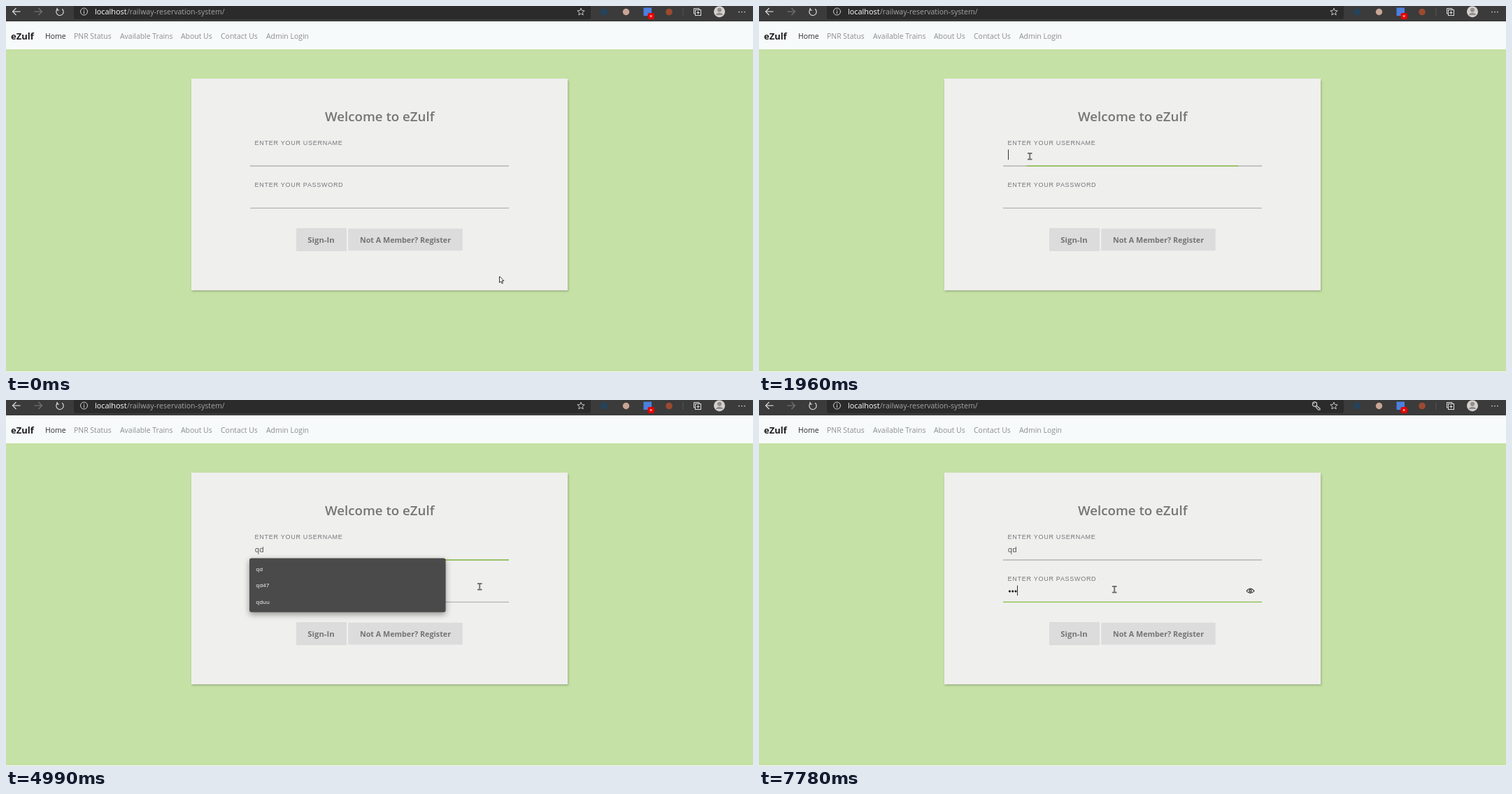
An HTML page with a canvas that plays this animation: 1068x524 px, repeating every 8000 ms.

```html
<!DOCTYPE html>
<html lang="en">
<head>
<meta charset="utf-8">
<title>Sign-in form</title>
<style>
  html, body { margin: 0; width: 100%; height: 100%; overflow: hidden; background: #c5e1a5; }
  canvas { display: block; width: 1068px; height: 524px; }
</style>
</head>
<body>
<canvas id="stage" width="1068" height="524"></canvas>
<script>
const ctx = document.getElementById('stage').getContext('2d');
const LOOP = 8000;
const UI = '"Open Sans", "Noto Sans", sans-serif';
const LABEL = '"Liberation Sans", Arial, sans-serif';
const GREEN = '#8bc34a';
const BRAND = 'eZulf';

const FOCUS_USER = 1560, OPEN_LIST = 2180, TYPE_USER = 3360, BLUR_USER = 4990, FOCUS_PASS = 5050;
const KEYS = [7540, 7630, 7780];
const ALL_NAMES = ['qd', 'staff7', '2031kzt5086', 'melidora_tuvash', 'tuvi', 'melidoratuvash'];
const MATCHES = ['qd', 'qd47', 'qduu'];

// time, x, y of the pointer, held until the next entry
const ARROW_PATH = [[0, 705.5, 387], [70, 680.5, 376.5], [570, 640, 352], [650, 535, 298]];
const BEAM_PATH = [
  [730, 439, 249], [960, 430, 243], [1034, 417, 234], [1108, 405, 226],
  [1182, 396, 220], [1256, 390, 217], [1330, 387, 215],
  [4050, 402, 209], [4127, 470, 205], [4203, 560, 206], [4280, 640, 213], [4357, 690, 225],
  [4433, 714, 239], [4510, 711, 251], [4587, 698, 260], [4663, 685, 265], [4740, 677, 267],
  [5520, 671, 267], [5595, 656, 268], [5670, 570, 270], [5740, 508, 271]
];
const USER_CARET = [[FOCUS_USER, 2200], [2720, 3900], [4430, BLUR_USER]];
const PASS_CARET = [[FOCUS_PASS, 5510], [6060, 6610], [7160, LOOP]];

const latest = (path, t) => path.filter(p => p[0] <= t).pop();
const within = (spans, t) => spans.some(([a, b]) => t >= a && t < b);

// Time of the latest of n evenly spaced updates between a and b
function held(t, a, b, n) {
  const gap = (b - a) / (n - 1);
  return a + Math.floor((Math.min(Math.max(t, a), b) - a) / gap + 1e-6) * gap;
}

// CSS "ease" curve
function ease(x) {
  if (x <= 0) return 0;
  if (x >= 1) return 1;
  const bez = (p, q, s) => 3 * p * s * (1 - s) ** 2 + 3 * q * s * s * (1 - s) + s ** 3;
  let lo = 0, hi = 1;
  for (let i = 0; i < 20; i++) {
    const mid = (lo + hi) / 2;
    if (bez(.25, .25, mid) < x) lo = mid; else hi = mid;
  }
  return bez(.1, 1, lo);
}

function rect(x, y, w, h, color, r = 0) {
  ctx.fillStyle = color;
  ctx.beginPath();
  ctx.roundRect(x, y, w, h, r);
  ctx.fill();
}

function shadowRect(x, y, w, h, color, r, alpha, blur, dx, dy) {
  ctx.save();
  ctx.shadowColor = `rgba(0,0,0,${alpha})`;
  ctx.shadowBlur = blur;
  ctx.shadowOffsetX = dx;
  ctx.shadowOffsetY = dy;
  rect(x, y, w, h, color, r);
  ctx.restore();
}

function disc(x, y, r, color) {
  ctx.fillStyle = color;
  ctx.beginPath();
  ctx.arc(x, y, r, 0, 7);
  ctx.fill();
}

function ring(x, y, r, color, from = 0, to = 2 * Math.PI, width = 1.1) {
  ctx.strokeStyle = color;
  ctx.lineWidth = width;
  ctx.beginPath();
  ctx.arc(x, y, r, from, to);
  ctx.stroke();
}

function line(points, color, width = 1.1) {
  ctx.strokeStyle = color;
  ctx.lineWidth = width;
  ctx.beginPath();
  points.forEach(([x, y]) => ctx.lineTo(x, y));
  ctx.stroke();
}

function text(str, x, y, size, color, weight = 400, family = UI, spacing = 0, align = 'left') {
  ctx.font = `${weight} ${size}px ${family}`;
  ctx.letterSpacing = spacing + 'px';
  ctx.textAlign = align;
  ctx.fillStyle = color;
  ctx.fillText(str, x, y);
}

function navArrow(x, dir, color) {
  line([[x - 5.5, 8], [x + 5.5, 8]], color);
  const tip = x + 5.5 * dir;
  line([[tip - 5 * dir, 3], [tip, 8], [tip - 5 * dir, 13]], color);
}

function star(x, y) {
  const points = [];
  for (let i = 0; i <= 10; i++) {
    const a = i * Math.PI / 5 - Math.PI / 2, r = i % 2 ? 2.4 : 5.4;
    points.push([x + r * Math.cos(a), y + r * Math.sin(a)]);
  }
  line(points, '#c4c4c4', 1);
}

function keyIcon() {
  ring(794.5, 6, 3.1, '#d8d8d8');
  disc(793.6, 5.2, .8, '#d8d8d8');
  line([[797, 8], [802, 12.3], [802, 14], [799.6, 14], [795.5, 9.4]], '#d8d8d8');
}

function toolbar(t) {
  rect(0, 0, 1068, 22, '#3b3b3b');
  rect(97, -8, 739, 27, '#2b2b2b', 3);
  navArrow(15, -1, '#e2e2e2');
  navArrow(46, 1, '#777');
  ring(77, 8.3, 5.2, '#e2e2e2', -.9, 4.1);
  line([[73, 2.8], [73, 6], [76, 6]], '#e2e2e2', 1);
  ring(111.5, 8, 5, '#d0d0d0', 0, 7, 1);
  rect(111, 7.2, 1, 3.8, '#d0d0d0');
  rect(111, 5, 1, 1.2, '#d0d0d0');
  text('localhost', 127, 12.3, 10.9, '#fff');
  text('/railway-reservation-system/', 173, 12.3, 10.55, '#a5a5a5');
  if (t >= KEYS[0]) keyIcon();
  star(822, 8.5);

  disc(855, 8.5, 5, '#24435c');
  disc(886.5, 8.5, 4.7, '#c9a595');
  rect(911.5, 2.5, 11.5, 11.5, '#4c80e0');
  rect(917.5, 10, 9.5, 9, '#e60000', 2);
  line([[920.8, 13.2], [923.4, 15.8]], '#fff', 1);
  line([[923.4, 13.2], [920.8, 15.8]], '#fff', 1);
  disc(948, 8.5, 4.8, '#9c4a30');
  rect(967.5, 3, 1, 11, '#555');

  line([[985, 11], [983.5, 11], [983.5, 3.5], [991, 3.5], [991, 5]], '#dcdcdc', 1);
  ctx.strokeRect(985.5, 5.5, 8, 8);
  line([[989.5, 7.3], [989.5, 11.7]], '#dcdcdc', 1);
  line([[987.3, 9.5], [991.7, 9.5]], '#dcdcdc', 1);

  disc(1020, 8.2, 8, '#d4d0cd');
  disc(1020, 5.8, 3, '#918d8a');
  ctx.beginPath();
  ctx.ellipse(1020, 13, 5, 3.2, 0, Math.PI, 0);
  ctx.fill();
  for (let i = 0; i < 3; i++) disc(1048 + i * 4, 8.5, .85, '#e2e2e2');
}

function navbar() {
  rect(0, 22, 1068, 40, '#f7fafa');
  text(BRAND, 7, 48, 13, '#1c1e1f', 700);
  text('Home', 56, 46.6, 10.45, '#2b2d2e');
  const links = [['PNR Status', 97], ['Available Trains', 163], ['About Us', 250],
    ['Contact Us', 307], ['Admin Login', 372]];
  links.forEach(([label, x]) => text(label, x, 46.6, 10.45, '#8b8e8f'));
}

function underline(y, h, grown) {
  rect(349, y, 370, h, '#b4b6b2');
  if (grown > 0) rect(534 - 185 * grown, y, 370 * grown, h, GREEN);
}

function form(t) {
  shadowRect(265, 104, 538, 303, '#efefee', 0, .24, 3, 1, 1.5);
  text('Welcome to ' + BRAND, 456, 165, 18.7, '#757575', 600);
  text('ENTER YOUR USERNAME', 355.6, 199.4, 9.02, '#757779', 400, LABEL, .694);
  text('ENTER YOUR PASSWORD', 355.6, 259.4, 9.02, '#757779', 400, LABEL, .694);

  const grow = ease((held(t, 1560, 2260, 10) - 1640) / 600);
  const swap = ease((held(t, 4990, 5740, 11) - FOCUS_PASS) / 600);
  underline(228.2, 1.6, grow - swap);
  underline(288.8, 1.2, swap);

  rect(415, 318, 72, 33, '#dcdcdc', 1);
  rect(489.3, 318.7, 163.5, 31.6, '#dcdcdc', 1);
  text('Sign-In', 450.5, 339, 11.3, '#747474', 700, UI, 0, 'center');
  text('Not A Member? Register', 571, 339, 10.75, '#747474', 700, UI, 0, 'center');
}

function eyeIcon() {
  ctx.strokeStyle = '#222';
  ctx.lineWidth = 1.1;
  ctx.beginPath();
  ctx.moveTo(697, 273.5);
  ctx.quadraticCurveTo(702.5, 266.5, 708, 273.5);
  ctx.quadraticCurveTo(702.5, 279.5, 697, 273.5);
  ctx.stroke();
  ring(702.5, 273.2, 1.6, '#222', 0, 7, 1.2);
}

function inputs(t) {
  const typed = t >= TYPE_USER;
  if (typed) text('qd', 355.8, 217.5, 10.45, '#434648');
  if (within(USER_CARET, t)) rect(typed ? 369 : 356, 205.5, 1, 14.5, '#333');

  const dots = KEYS.filter(k => t >= k).length;
  for (let i = 0; i < dots; i++) disc(358.4 + i * 4.3, 273.8, 1.6, '#222');
  if (within(PASS_CARET, t)) rect(356 + Math.round(dots * 4.4), 265.5, 1, 14.5, '#333');
  if (dots) eyeIcon();
}

function suggestions(t) {
  if (t < OPEN_LIST || t >= FOCUS_PASS) return;
  const names = t < TYPE_USER ? ALL_NAMES : MATCHES;
  shadowRect(348, 226.4, 280.6, names.length * 23.8 + 6, '#4a4a4a', 3, .4, 9, 0, 3);
  names.forEach((name, i) => text(name, 357.3, 244.6 + i * 23.8, 8, '#fff'));
}

function arrow(x, y) {
  ctx.beginPath();
  [[0, 0], [0, 9], [2.1, 7.2], [3.6, 10.4], [5, 9.7], [3.6, 6.6], [6.3, 6.4]]
    .forEach(([dx, dy]) => ctx.lineTo(x + dx, y + dy));
  ctx.closePath();
  ctx.fillStyle = '#fff';
  ctx.fill();
  ctx.strokeStyle = '#333';
  ctx.lineWidth = 1;
  ctx.stroke();
}

function beam(x, y) {
  rect(x - 3, y - 5, 6.5, 1.8, '#666');
  rect(x - 3, y + 3.6, 6.5, 1.8, '#666');
  rect(x - .8, y - 4, 2, 8.5, '#777');
}

function pointer(t) {
  const pos = latest(BEAM_PATH, t);
  if (pos) beam(pos[1], pos[2]);
  else arrow(...latest(ARROW_PATH, t).slice(1));
}

function draw(t) {
  rect(0, 0, 1068, 524, '#c5e1a5');
  rect(0, 523, 1068, 1, '#f4f8ef');
  toolbar(t);
  navbar();
  form(t);
  inputs(t);
  suggestions(t);
  pointer(t);
}

const start = performance.now();
function tick() {
  draw((performance.now() - start) % LOOP);
  requestAnimationFrame(tick);
}
tick();
</script>
</body>
</html>
```
